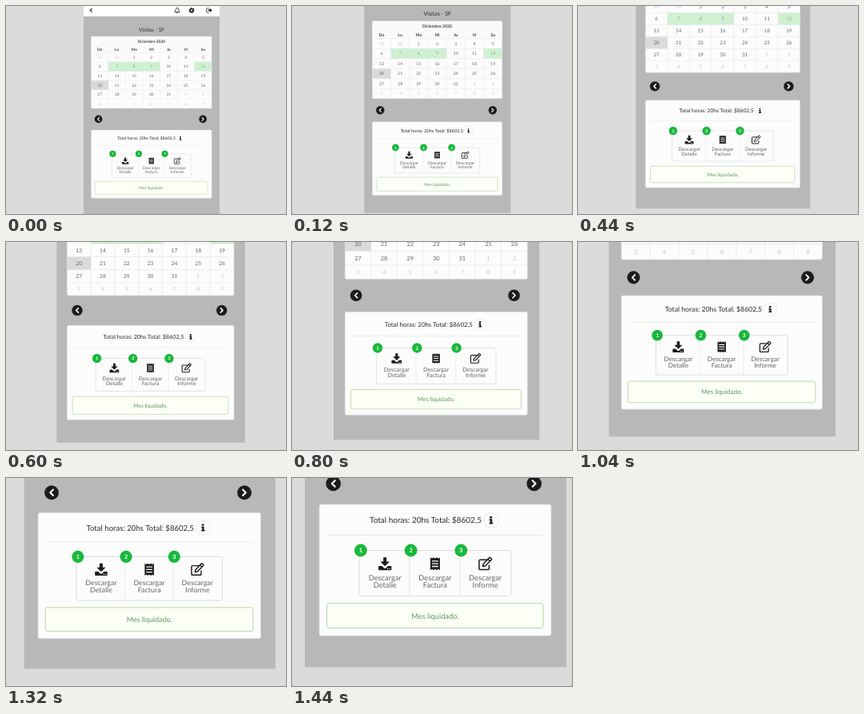
Write an HTML page that moves like this. It is 350 px wide and 260 px high and loops after 1520 ms.

```html
<!DOCTYPE html>
<html lang="es">
<head>
<meta charset="utf-8">
<title>Visitas</title>
<style>
  html, body { margin: 0; width: 100%; height: 100%; overflow: hidden; background: #dbdbdb; }
  svg { display: block; width: 100vw; height: 100vh; }
  text { font-family: Lato, sans-serif; font-size: 9.3px; text-anchor: middle; fill: #666; text-rendering: geometricPrecision; }
  .bold { font-weight: 700; fill: #3c3d3e; }
  .dim { fill: #c8c8c8; }
  .green { fill: #7fae82; }
  .dark { fill: #2b2c2d; }
  .card { fill: #fcfcfc; stroke: #d4d4d5; stroke-width: .8; }
  .rule { fill: none; stroke: #e3e4e5; stroke-width: .8; }
  .ico { fill: #1b1c1d; }
  .line { fill: none; stroke: #1b1c1d; stroke-width: 1.5; stroke-linejoin: round; stroke-linecap: round; }
  .cut { fill: none; stroke: #fcfcfc; stroke-width: 1.3; }
</style>
</head>
<body>
<svg viewBox="0 0 350 260" preserveAspectRatio="none">
  <defs>
    <g id="download">
      <path class="ico" d="M-2-8h4v5.2h3.8L0 3-5.8-2.800H-2z"/>
      <path class="ico" d="M-7.300 2.800h3.600L-1.500 5q1.500 1.300 3 0l2.200-2.200h3.600q.8 0 .8.8v3.600q0 .8-.8.8H-7.300q-.8 0-.8-.8V3.600q0-.8.8-.8z"/>
      <path class="cut" d="M3 6.200h1.100M5.300 6.200h1.100"/>
    </g>
    <g id="receipt">
      <path class="ico" d="M-6-8l2 1.400 2-1.400 2 1.400 2-1.400 2 1.400 2-1.400V8l-2-1.400L2 8 0 6.600-2 8l-2-1.400L-6 8z"/>
      <path class="cut" d="M-4-3.300h8M-4 0h8M-4 3.300h8"/>
    </g>
    <g id="edit">
      <path class="line" d="M1.500-5H-6.500q-1.200 0-1.200 1.200V6q0 1.200 1.200 1.200H3.600q1.200 0 1.200-1.200V2"/>
      <path class="line" d="M-3 3.300l.5-3L5-7.600q.7-.6 1.400 0l1.200 1.200q.6.700 0 1.400L0 2.800zM3.300-5.900l2.600 2.600"/>
    </g>
    <path id="chevron" d="M2-3.800L-1.800 0 2 3.800" fill="none" stroke-width="2.200" stroke-linecap="round" stroke-linejoin="round"/>
  </defs>
  <g id="page">
    <path fill="#b8b8b8" d="M16-300H343V236.500H16z"/>

    <path fill="#fff" d="M16-300H343V-240H16z"/>
    <use href="#chevron" x="33.500" y="-254.500" stroke="#1b1c1d"/>
    <g transform="translate(241 -254.500)">
      <path class="line" d="M-5.500 3.500Q-3.800 2-3.800-1.500-3.500-5.500 0-5.700 3.500-5.500 3.800-1.500 3.800 2 5.500 3.500z"/>
      <path class="ico" d="M-2 5h4q-.5 2-2 2t-2-2zM-.8-7.200H.8v2H-.8z"/>
    </g>
    <g transform="translate(275.600 -254.500)" fill="none" stroke="#1b1c1d">
      <circle r="3.800" stroke-width="3.200"/>
      <circle r="5.900" stroke-width="2" stroke-dasharray="2.700 3.480"/>
    </g>
    <g transform="translate(318 -254.500)">
      <path class="line" d="M-1.500-5.200H-5q-1.500 0-1.500 1.500v7.400Q-6.500 5.200-5 5.200h3.500"/>
      <path class="ico" d="M-3-1.700H1.500V-5L7 0 1.500 5V1.700H-3z"/>
    </g>

    <text class="dark" x="179.500" y="-204" style="font-size:12.700px">Visitas - SF</text>

    <g id="calendar">
      <rect class="card" x="34" y="-192" width="290" height="173.300" rx="2.700"/>
      <path fill="#f8fafb" d="M34.400-153.100v-36q0-2.500 2.500-2.500h284.200q2.500 0 2.500 2.500v36z"/>
      <text class="bold" x="179" y="-176.500">Diciembre 2020</text>
    </g>
    <g id="nav"></g>

    <rect class="card" x="34" y="33" width="290" height="164.200" rx="2.700"/>
    <text class="dark" x="97" y="56.300" style="font-size:10px;text-anchor:start">Total horas: 20hs Total: $8602,5</text>
    <circle cx="249" cy="52.800" r="9.200" fill="#fefefe" stroke="#dedede" stroke-width=".8"/>
    <path class="ico" d="M247.300 48h2.800v2.400h-2.800zM246.600 51.300h3.600v4.500h1v1.600h-4.600v-1.600h1V53h-1z"/>
    <path class="rule" d="M43.500 71.500H314"/>

    <rect x="84" y="90.500" width="190" height="57" rx="2.700" fill="#fcfcfc" stroke="#d6d8d9" stroke-width=".9"/>
    <path class="rule" d="M147 91V147M210.300 91V147"/>
    <g id="actions"></g>

    <rect x="43.500" y="156.700" width="270.500" height="30.800" rx="2.700" fill="#fcfff5" stroke="#b3cca4" stroke-width=".9"/>
    <text x="179" y="175.600" style="fill:#5b995e">Mes liquidado.</text>
  </g>
</svg>
<script>
const $ = id => document.getElementById(id);

function add(parent, tag, attrs, content) {
  const el = document.createElementNS('http://www.w3.org/2000/svg', tag);
  for (const key in attrs) el.setAttribute(key, attrs[key]);
  if (content !== undefined) el.textContent = content;
  parent.appendChild(el);
  return el;
}

function drawCalendar() {
  const cal = $('calendar');
  const left = 34, top = -153.1, w = 290 / 7, h = 22.4;
  const marked = [7, 8, 9, 12], today = 20;
  const centre = col => left + (col + .5) * w;

  ['Do', 'Lu', 'Ma', 'Mi', 'Ju', 'Vi', 'Sa'].forEach((name, col) =>
    add(cal, 'text', { x: centre(col), y: -158, class: 'bold' }, name));

  let grid = '';
  for (let i = 0; i < 42; i++) {
    const col = i % 7, row = Math.floor(i / 7), n = i - 1;
    const x = left + col * w, y = top + row * h;
    const inside = n >= 1 && n <= 31;
    const green = inside && marked.includes(n);
    const day = n < 1 ? 30 + n : n > 31 ? n - 31 : n;
    if (green || n === today)
      add(cal, 'rect', { x, y, width: w, height: h, fill: green ? '#cff0d1' : '#dadada' });
    add(cal, 'text', {
      x: centre(col), y: y + h / 2 + 3.3,
      class: green ? 'green' : inside ? '' : 'dim'
    }, day);
    if (!col) grid += `M${left} ${y}h290`;
    if (!row && col) grid += `M${x} ${top}v${6 * h}`;
  }
  add(cal, 'path', { class: 'rule', d: grid });
}

function drawNav() {
  [[51.7, 1], [302.7, -1]].forEach(([x, flip]) => {
    const g = add($('nav'), 'g', { transform: `translate(${x} 7) scale(${flip} 1)` });
    add(g, 'circle', { r: 9.3, fill: '#1b1c1d' });
    add(g, 'use', { href: '#chevron', stroke: '#fff' });
  });
}

function drawActions() {
  [['download', 'Detalle'], ['receipt', 'Factura'], ['edit', 'Informe']].forEach(([icon, label], i) => {
    const g = add($('actions'), 'g', { transform: `translate(${116.2 + i * 62.7} 0)` });
    add(g, 'use', { href: '#' + icon, y: 107.2 });
    add(g, 'text', { y: 128 }, 'Descargar');
    add(g, 'text', { y: 137 }, label);
    add(g, 'circle', { cx: -30.3, cy: 90.5, r: 7.9, fill: '#19b83c' });
    add(g, 'text', { x: -30.3, y: 93.2, style: 'font-size:7.6px;font-weight:700;fill:#fff' }, i + 1);
  });
}

// Linear zoom in 36 steps, then a short hold before the loop restarts.
const LOOP = 1520, STEP = 40, STEPS = 36;

function frame() {
  const k = Math.min(STEPS, Math.floor(performance.now() % LOOP / STEP));
  const rest = 1 - k / STEPS;
  $('page').setAttribute('transform',
    `translate(${88.7 * rest} ${137.8 * rest}) scale(${1 - .48 * rest})`);
  requestAnimationFrame(frame);
}

drawCalendar();
drawNav();
drawActions();
frame();
</script>
</body>
</html>
```
